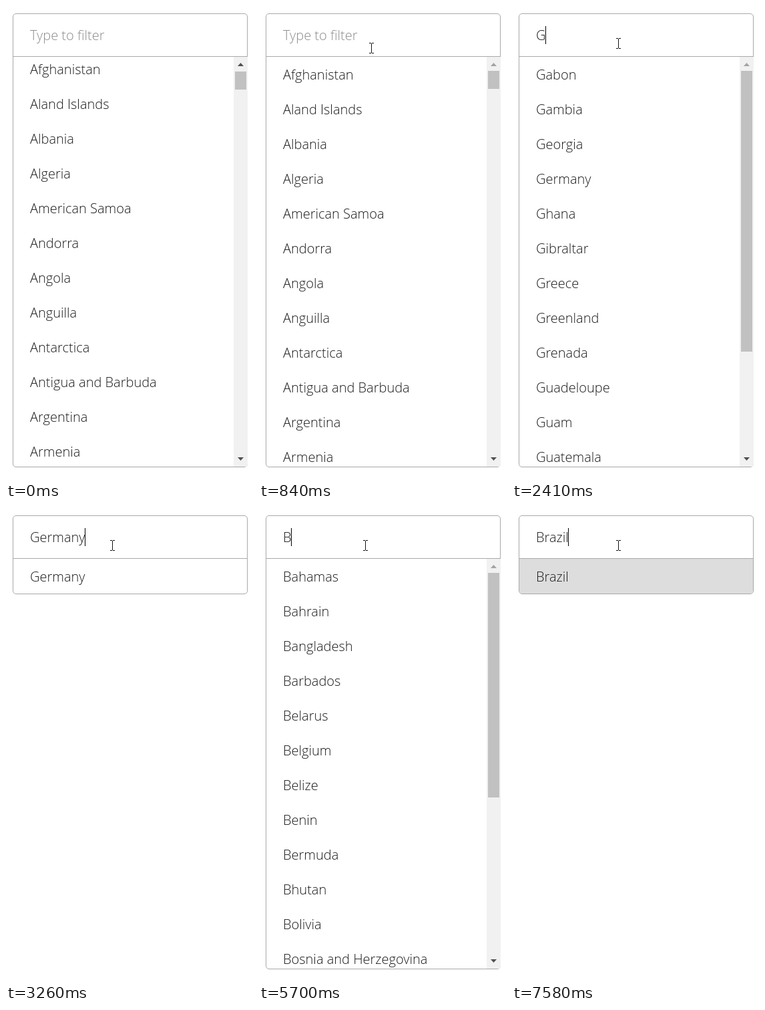
Animation, 370 px wide and 709 px high, one loop 8000 ms. Source, as an HTML page:

```html
<!DOCTYPE html>
<html lang="en">
<head>
<meta charset="utf-8">
<title>Country filter</title>
<style>
  html, body { margin: 0; width: 100%; height: 100%; overflow: hidden; background: #fff; }
  body { position: relative; font: 300 20px/27px "Open Sans", sans-serif; color: #1c1c1c; white-space: pre; }
  div, svg { position: absolute; box-sizing: border-box; }
  #box { left: 10px; top: 11px; width: 352px; border: 1px solid #a9a9a9; border-radius: 5px; }
  #rule { left: 11px; top: 75px; width: 350px; height: 1px; background: #a9a9a9; }
  #field { left: 36px; top: 30px; height: 27px; }
  #field span { display: inline-block; height: 27px; vertical-align: top; }
  #field .hint { color: #8c8c8c; }
  #field .selected { background: #3390ff; color: #fff; }
  #field .caret { width: 1px; margin: 0 -.5px; background: #000; }
  #list { left: 11px; top: 76px; overflow: hidden; border-radius: 0 0 4px 4px; }
  #list div { left: 0; width: 100%; height: 52px; padding: 13px 25px 0; }
  #list .active { background: #ddd; }
  #bar { left: 341px; top: 76px; width: 21px; height: 613px; background: #f1f1f1; border-radius: 0 0 4px 0; }
  #thumb { left: 2px; width: 17px; background: #c1c1c1; }
  #bar svg { left: 0; top: 0; }
</style>
</head>
<body>
<div id="box"></div>
<div id="list"></div>
<div id="rule"></div>
<div id="field"></div>
<div id="bar">
  <div id="thumb"></div>
  <svg width="21" height="613">
    <path id="up" d="M6 14L10.5 9L15 14Z"/>
    <path d="M6 599L10.5 604L15 599Z" fill="#505050"/>
  </svg>
</div>
<svg id="hand" width="18" height="25" fill="#fff" stroke="#111">
  <path d="M5 2.2a1.7 1.7 0 0 1 3.4 0V8l6 1.3q2.2.5 2.2 2.7v5q-.4 3-1.6 4v2.5H7V21L1.2 14.5q-1.2-2 .4-2.6T5 14Z"/>
  <path d="M8.4 8v4M11.2 9v3M14 9.5v3" fill="none"/>
</svg>
<svg id="beam" width="7" height="16" fill="none" stroke="#111">
  <path d="M0 .5H3M4 .5H7M3.5 1V15M0 15.5H3M4 15.5H7"/>
</svg>
<script>
const $ = id => document.getElementById(id);
const LOOP = 8000, ROW = 52, VIEW = 613, TRACK = 571, TOTAL = 249;

const countries = ("Afghanistan,Aland Islands,Albania,Algeria,American Samoa,Andorra,Angola,Anguilla," +
  "Antarctica,Antigua and Barbuda,Argentina,Armenia,Bahamas,Bahrain,Bangladesh,Barbados,Belarus," +
  "Belgium,Belize,Benin,Bermuda,Bhutan,Bolivia,Bosnia and Herzegovina,Botswana,Bouvet Island,Brazil," +
  "British Indian Ocean Territory,Brunei Darussalam,Bulgaria,Burkina Faso,Burundi,Gabon,Gambia," +
  "Georgia,Germany,Ghana,Gibraltar,Greece,Greenland,Grenada,Guadeloupe,Guam,Guatemala,Guernsey," +
  "Guinea,Guinea-Bissau,Guyana").split(",");

// Each step changes only the listed properties of the state before it.
const start = { text: "", caret: false, selected: false, active: -1, scroll: 8, hand: null, beam: null };
const steps = [
  [0, {}],
  [530, { active: 2, hand: [300, 190] }],
  [610, { active: 1, hand: [242, 126] }],
  [690, { active: 0, hand: [212, 98], scroll: 0 }],
  [770, { active: -1, hand: null, beam: [178, 56] }],
  [840, { beam: [168, 63] }],
  [930, { beam: [166, 66] }],
  [1430, { beam: [159, 56], caret: true }],
  [2010, { caret: false }],
  [2410, { text: "G", caret: true }],
  [2560, { text: "Ge" }],
  [2650, { text: "Ger" }],
  [2800, { text: "Germ" }],
  [3260, { text: "Germany" }],
  [3350, { active: 0 }],
  [3810, { caret: false }],
  [4450, { selected: true }],
  [5700, { text: "B", caret: true, selected: false, active: -1 }],
  [5930, { text: "Br" }],
  [6100, { text: "Bra" }],
  [6480, { text: "Brazil", active: 0 }],
  [7030, { caret: false }],
  [7580, { caret: true }],
];

function place(el, point, dx, dy) {
  el.style.display = point ? "" : "none";
  if (point) {
    el.style.left = point[0] - dx + "px";
    el.style.top = point[1] - dy + "px";
  }
}

function render({ text, caret, selected, active, scroll, hand, beam }) {
  const matches = countries.filter(name => name.startsWith(text));
  const count = text ? matches.length : TOTAL;
  const height = Math.min(VIEW, count * ROW);
  const scrolls = count * ROW > VIEW;

  $("box").style.height = height + 66 + "px";
  $("list").style.height = height + "px";
  $("list").style.width = (scrolls ? 329 : 350) + "px";
  $("list").innerHTML = matches.slice(0, 12).map((name, i) =>
    `<div class="${i === active ? "active" : ""}" style="top:${i * ROW - scroll}px">${name}</div>`).join("");

  const caretMark = caret ? '<span class="caret"></span>' : "";
  $("field").innerHTML = text
    ? `<span class="${selected ? "selected" : ""}">${text}</span>${caretMark}`
    : `${caretMark}<span class="hint">Type to filter</span>`;

  $("bar").style.display = scrolls ? "" : "none";
  $("thumb").style.height = Math.floor(TRACK * VIEW / (count * ROW)) + "px";
  $("thumb").style.top = 21 + Math.ceil(scroll / (count * ROW) * TRACK) + "px";
  $("up").setAttribute("fill", scroll ? "#505050" : "#a3a3a3");

  place($("hand"), hand, 0, 0);
  place($("beam"), beam, 3, 8);
}

let shown = -1;
function frame() {
  const time = performance.now() % LOOP;
  const index = steps.findLastIndex(([at]) => at <= time);
  if (index !== shown) {
    shown = index;
    render(Object.assign({}, start, ...steps.slice(0, index + 1).map(step => step[1])));
  }
  requestAnimationFrame(frame);
}
frame();
</script>
</body>
</html>
```
